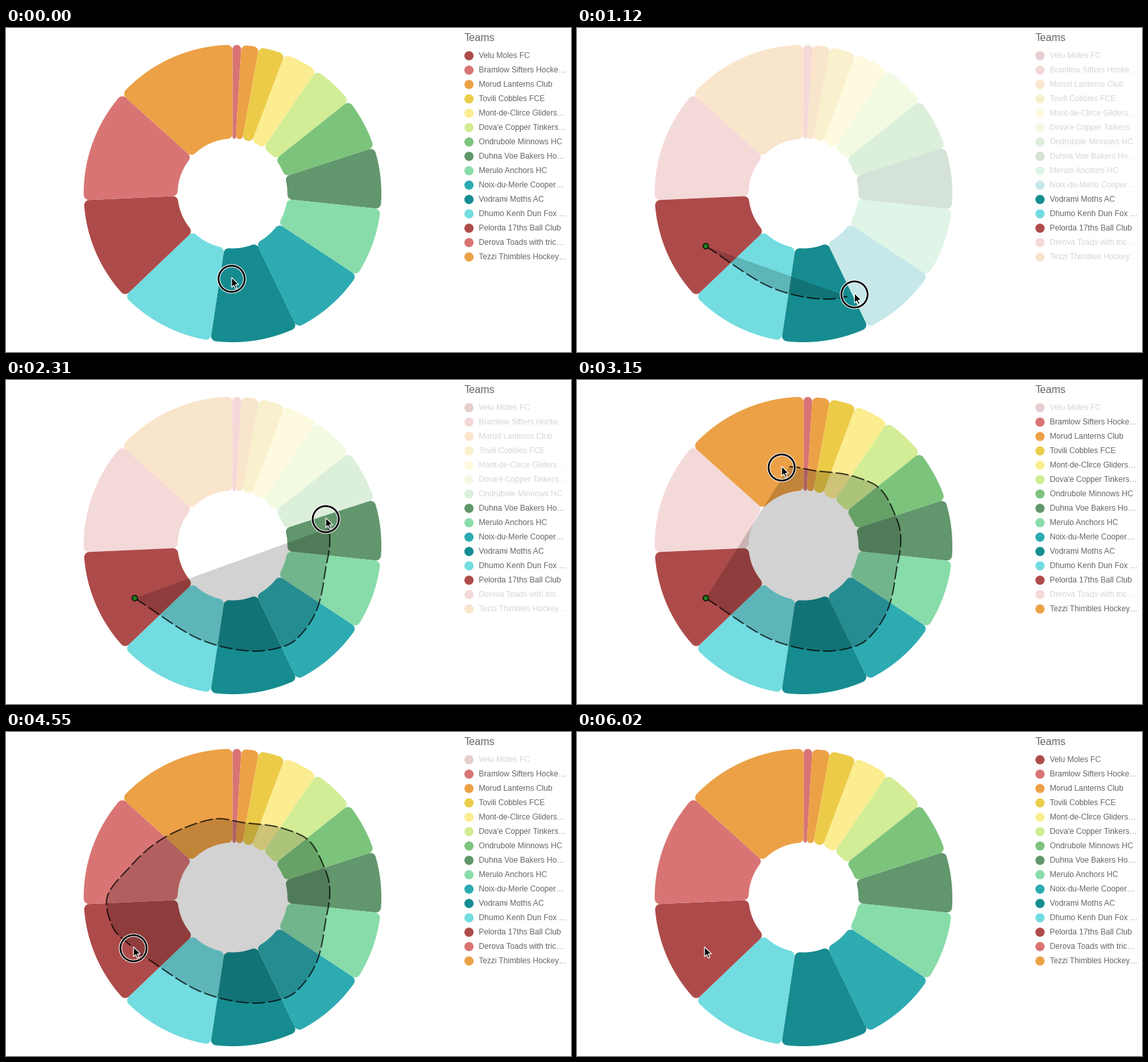
Recreate the animation shown at these times as a matplotlib script. Size 864x496 px, loop 6.09 s.

```python
import numpy as np
import matplotlib.pyplot as plt
from matplotlib.animation import FuncAnimation
from matplotlib.patches import Circle, Polygon

W, H, DPI = 864, 496, 32
PX = 72 / DPI                      # points per pixel
STEP, FRAMES = 70, 87
MID = np.array([346.4, 253.4])
R_OUT, R_IN, CORNER = 227.6, 84, 8
FADED = 0.27
INK = "#666666"

PALETTE = ["#ad4b4a", "#d87574", "#eca146", "#eccb48", "#fbed90", "#d2ed95",
           "#7cc47c", "#62966c", "#88dcaa", "#2dabb1", "#168c90", "#72dce0"]
TEAMS = ["Velu Moles FC", "Bramlow Sifters Hocke…", "Morud Lanterns Club",
         "Tovili Cobbles FCE", "Mont-de-Clirce Gliders…",
         "Dova'e Copper Tinkers…", "Ondrubole Minnows HC",
         "Duhna Voe Bakers Ho…", "Merulo Anchors HC",
         "Noix-du-Merle Cooper…", "Vodrami Moths AC",
         "Dhumo Kenh Dun Fox …", "Pelorda 17ths Ball Club",
         "Derova Toads with tric…", "Tezzi Thimbles Hockey…"]

# Team k has the value k, so slice edges are triangular numbers.
RANKS = np.arange(len(TEAMS))
EDGES = 360 * np.cumsum(RANKS) / RANKS.sum()

# Cursor drag: time in ms, x, y
DRAG = np.array([
    (280, 197, 334), (560, 290, 394), (700, 326, 407), (900, 378, 415),
    (1100, 421, 409), (1400, 455, 385), (1680, 478, 344), (1900, 487, 300),
    (2310, 489, 213), (2520, 458, 162), (2640, 425, 148), (2860, 365, 139),
    (3150, 313, 134), (3420, 245, 160), (3720, 190, 206), (3950, 154, 256),
    (4120, 163, 298), (4340, 195, 331)], float)
TIMES, STOPS = DRAG[:, 0], DRAG[:, 1:]
SPEEDS = np.gradient(STOPS, TIMES, axis=0)
PRESS, CLOSE = TIMES[0], TIMES[-1]
LASSO_ON, RELEASE, LAG = 700, 4830, 60
HOVER = np.array([345, 384])


def drag(t):
    """Smooth cursor positions at the given times (cubic Hermite)."""
    t = np.clip(t, PRESS, CLOSE)
    i = np.clip(np.searchsorted(TIMES, t, side="right") - 1, 0, len(TIMES) - 2)
    h = (TIMES[i + 1] - TIMES[i])[:, None]
    u = (t - TIMES[i])[:, None] / h
    ease = u * u * (3 - 2 * u)
    return (STOPS[i] * (1 - ease) + STOPS[i + 1] * ease
            + h * u * (1 - u) * (SPEEDS[i] * (1 - u) - SPEEDS[i + 1] * u))


def cursor(t):
    if t >= PRESS:
        return drag(np.array([t]))[0]
    u = t / PRESS
    return HOVER + (STOPS[0] - HOVER) * u * u * (3 - 2 * u)


def entry_times():
    """Time at which the drag first reaches each team's slice."""
    t = np.linspace(PRESS, CLOSE, 3000)
    x, y = (drag(t) - MID).T
    owner = np.searchsorted(EDGES, np.degrees(np.arctan2(x, -y)) % 360,
                            side="right")
    return [t[owner == k].min(initial=np.inf) for k in RANKS]


def direction(deg):
    a = np.radians(deg)
    return np.array([np.sin(a), -np.cos(a)])


def arc(center, radius, start, stop, n=12):
    return center + radius * direction(np.linspace(start, stop, n)).T


def sector(a0, a1):
    """Ring sector with rounded corners, angles clockwise from the top."""
    s = np.sin(np.radians((a1 - a0) / 2))
    ro = min(CORNER, R_OUT * s / (1 + s))
    ri = min(CORNER, R_IN * s / (1 - s))
    do = np.degrees(np.arcsin(ro / (R_OUT - ro)))
    di = np.degrees(np.arcsin(ri / (R_IN + ri)))

    def outer(a):
        return MID + (R_OUT - ro) * direction(a)

    def inner(a):
        return MID + (R_IN + ri) * direction(a)

    return np.vstack([
        arc(outer(a0 + do), ro, a0 - 90, a0 + do),
        arc(MID, R_OUT, a0 + do, a1 - do, 60),
        arc(outer(a1 - do), ro, a1 - do, a1 + 90),
        arc(inner(a1 - di), ri, a1 + 90, a1 - di + 180),
        arc(MID, R_IN, a1 - di, a0 + di, 40),
        arc(inner(a0 + di), ri, a0 + di + 180, a0 + 270)])


fig = plt.figure(figsize=(W / DPI, H / DPI), dpi=DPI, facecolor="white")
ax = fig.add_axes([0, 0, 1, 1])
ax.set_xlim(0, W)
ax.set_ylim(H, 0)
ax.axis("off")


def label(x, y, text, size):
    return ax.text(x, y, text, fontsize=size * PX, color=INK,
                   family="Liberation Sans", va="baseline")


label(701, 20, "Teams", 16)
groups = []
for k, name in enumerate(TEAMS):
    color = PALETTE[k % len(PALETTE)]
    parts = [ax.add_patch(Circle((708, 42.5 + 22 * k), 7, fc=color, ec="none")),
             label(723, 46 + 22 * k, name, 12)]
    if k:
        parts.append(ax.add_patch(
            Polygon(sector(EDGES[k - 1], EDGES[k]), fc=color, ec="none")))
    groups.append(parts)

area = ax.add_patch(Polygon(STOPS, fc="black", ec="none", alpha=0.175, zorder=3))
trail, = ax.plot([], [], color="black", alpha=0.75, lw=2 * PX,
                 ls=(0, (10, 2.5)), zorder=4)
dot = ax.add_patch(Circle(STOPS[0], 4.2, fc="#1f7a1f", ec="black",
                          lw=1.2 * PX, zorder=5))
rings = [ax.add_patch(Circle(HOVER, 20, fill=False, ec=c, lw=w * PX, zorder=6))
         for c, w in (("white", 4.8), ("black", 2.7))]
ARROW = np.array([(0, 0), (0, 15), (3.4, 11.8), (5.8, 17.2), (8.2, 16.2),
                  (5.8, 10.8), (10.6, 10.6)])
arrow = ax.add_patch(Polygon(ARROW, fc="black", ec="white", lw=1.2 * PX, zorder=7))
ENTRY = entry_times()


def update(i):
    t = i * STEP
    pos = cursor(t)
    arrow.set_xy(ARROW + pos - (0, 2))
    for ring in rings:
        ring.set_center(pos)
        ring.set_visible(t < RELEASE)

    active = LASSO_ON <= t < RELEASE
    reach = min(t - LAG, CLOSE) if t > LASSO_ON else PRESS
    drawing = active and reach > PRESS
    if drawing:
        pts = drag(np.arange(PRESS, reach + 1, 10))
        area.set_xy(pts)
        trail.set_data(*pts.T)
    area.set_visible(drawing)
    trail.set_visible(drawing)
    dot.set_visible(active and reach < CLOSE)

    for parts, entry in zip(groups, ENTRY):
        for part in parts:
            part.set_alpha(FADED if active and reach < entry else 1)
    return []


anim = FuncAnimation(fig, update, frames=FRAMES, interval=STEP,
                     repeat=True, repeat_delay=0, blit=False)
plt.show()
```
